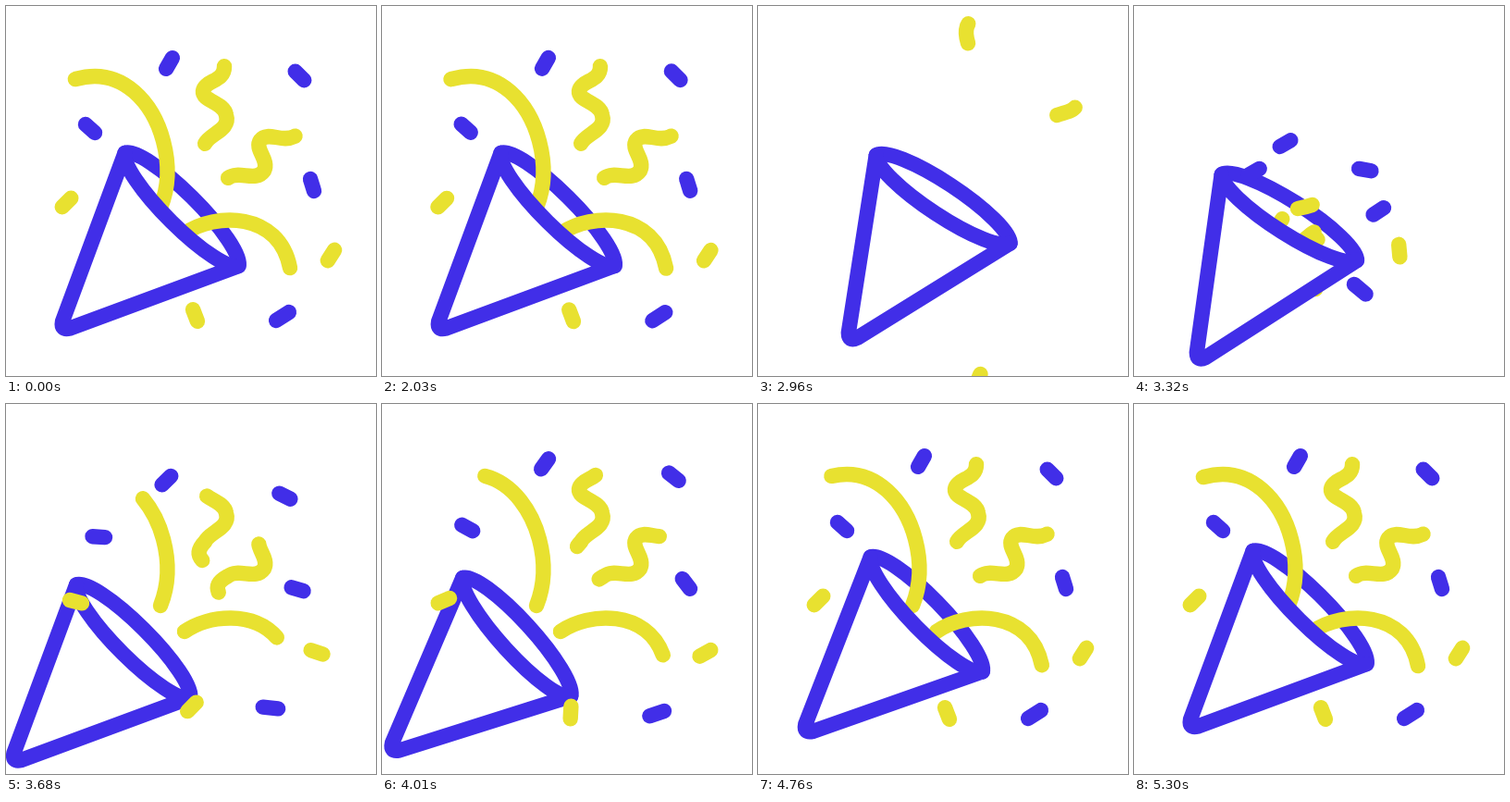
Animation of 400x400 px, one loop 5.33 s. Source, as an HTML page:

```html
<!DOCTYPE html>
<html lang="en">
<head>
<meta charset="utf-8">
<title>Party popper</title>
<style>
html, body { margin: 0; width: 100%; height: 100%; overflow: hidden; background: #fff; }
svg { display: block; width: 100vw; height: 100vh; }
path, line { stroke-width: 16.4; stroke-linecap: round; stroke-linejoin: round; fill: none; }
.blue { stroke: #412ee8; }
.yellow { stroke: #e8e130; }
#front { fill: #fff; }
</style>
</head>
<body>
<svg viewBox="0 0 400 400">
  <path id="back" class="blue" d="M128.5 159A87 19 45 0 1 251.5 281"/>
  <g id="under"></g>
  <g id="ribbons"></g>
  <path id="front" class="blue" d="M251.5 281A87 19 45 0 1 128.5 159L61 341Q59 351 69 348.500Z"/>
  <g id="over"></g>
</svg>
<script>
const LOOP = 5330, START = 2000, BLAST = 3170;
const $ = id => document.getElementById(id);

function make(tag, cls, parent) {
  const el = document.createElementNS("http://www.w3.org/2000/svg", tag);
  el.setAttribute("class", cls);
  parent.append(el);
  return el;
}

// Monotone cubic through rows of [time, ...values]
function sample(rows, t) {
  const n = rows.length - 1;
  if (t <= rows[0][0]) return rows[0].slice(1);
  if (t >= rows[n][0]) return rows[n].slice(1);
  let i = 0;
  while (t > rows[i + 1][0]) i++;
  const rate = (j, k) => (rows[j + 1][k] - rows[j][k]) / (rows[j + 1][0] - rows[j][0]);
  const slope = (j, k) => {
    if (j === 0 || j === n) return 0;
    const a = rate(j - 1, k), b = rate(j, k);
    return a * b > 0 ? 2 * a * b / (a + b) : 0;
  };
  const h = rows[i + 1][0] - rows[i][0], x = (t - rows[i][0]) / h;
  return rows[i].slice(1).map((v, m) => {
    const k = m + 1, w = rows[i + 1][k], y = x * x * (3 - 2 * x);
    return v + (w - v) * y
      + h * x * (1 - x) * ((1 - x) * slope(i, k) - x * slope(i + 1, k));
  });
}

// time, mouth centre x, y, tilt
const CONE = [
  [START, 190, 220, 0], [2570, 196, 213.5, -6.6], [3150, 201, 208, -12.5],
  [3320, 168, 228.5, -12.4], [3440, 147, 247, -9], [3560, 138, 255, -4],
  [3680, 137.5, 256.5, 0], [3900, 142, 254, 2.5], [4190, 154, 247.5, 3],
  [4340, 164.5, 241, 2.8], [4730, 181.5, 228, 1], [5300, 190, 220, 0]
];

// Ribbon route = lead-in + resting curve + way out.
// Keys are [time, tail, head] in lengths of the resting curve.
const squiggleOut = [[START, 0, 1], [2570, 0.24, 1.1], [3140, 1.5, 1.5]];
const squiggleIn = [[3200, -0.9, -0.9], [3320, -0.9, -0.76], [3680, -0.2, 0.6], [4340, 0, 1]];
const ribbons = [
  {
    lead: "M150 250Q159 232 167 218",
    rest: "C175 198 178 176 170 146C160 108 128 64 75 79",
    exit: "C50 86 20 88 11 55C5 35 -10 10 -34 10",
    out: [[START, 0, 1], [2570, 0.72, 1.38], [3080, 1.75, 1.75]],
    in: [[3240, -0.17, -0.17], [3320, -0.08, -0.07], [3680, 0, 0.6], [4340, 0, 0.93], [5240, 0, 1]]
  },
  {
    lead: "M199 253L193 246",
    rest: "C226 223 295 222 307 283",
    exit: "C311 303 306 357 276 365C255 372 240 390 235 415",
    out: [[START, 0, 1], [2570, 1.14, 1.66], [3080, 2.1, 2.1]],
    in: [[3240, -0.06, -0.06], [3320, -0.06, -0.05], [3680, 0, 0.76], [4340, 0, 0.98], [5240, 0, 1]]
  },
  {
    lead: "M177 219C205 214 225 200 222 182C223 172 197 168 215 149",
    rest: "C220 138 243 134 238 118C236 104 212 103 213 92C215 80 236 82 236 66",
    exit: "C236 60 231 58 231 55C230 44 222 34 226 22Q229 16 230 11",
    out: squiggleOut, in: squiggleIn
  },
  {
    lead: "M178 258L191 247C205 236 238 232 234 214C230 202 222 196 240 186",
    rest: "C252 177 270 191 279 178C285 166 268 155 275 145C283 135 298 148 312 141",
    exit: "C317 138 316 134 316 130C316 115 330 118 340 112Q348 106 349 96",
    out: squiggleOut, in: squiggleIn
  }
];

for (const r of ribbons) {
  r.el = make("path", "yellow", $("ribbons"));
  const measure = d => {
    r.el.setAttribute("d", d);
    return r.el.getTotalLength();
  };
  r.base = measure(r.lead);
  r.unit = measure(r.lead + r.rest) - r.base;
  r.total = measure(r.lead + r.rest + r.exit);
}

// rest x, y, angle | entry offset and turn | exit offset | length
const bits = [
  ["blue", 176.5, 62, -60, -13, 87, 30, -2, -63],
  ["blue", 317.5, 75.5, 45, -68, 102, -35, 60, -79],
  ["blue", 91, 132.5, 42, 39, 47, -72, -95, -103],
  ["blue", 331, 193.5, 73, -67, 28.5, -106, 73, -54],
  ["blue", 299, 335.5, -33, -55, -29.5, 73, 109, 67, 16.5],
  ["yellow", 65.5, 212.5, -45, 42, 5, 112, -100, 30],
  ["yellow", 204.5, 334.5, 69, -15, -30, 124, 34, 72],
  ["yellow", 351.5, 269.5, -57, -65, -5, 142, 100, 50]
].map(([color, x, y, angle, dx, dy, turn, ex, ey, len = 13.5]) => {
  const el = make("line", color, $("over"));
  el.setAttribute("x1", -len / 2);
  el.setAttribute("x2", len / 2);
  return { el, x, y, angle, dx, dy, turn, ex, ey };
});

function drawCone(t) {
  const [x, y, tilt] = sample(CONE, t);
  const move = `translate(${x - 190} ${y - 220}) rotate(${tilt} 190 220)`;
  $("back").setAttribute("transform", move);
  $("front").setAttribute("transform", move);
}

function drawRibbon(r, t) {
  const [a, b] = sample(t < BLAST ? r.out : r.in, t);
  const at = u => Math.min(r.total, Math.max(0, r.base + u * r.unit));
  const tail = at(a), len = at(b) - tail;
  r.el.style.display = len > 0.1 ? "" : "none";
  r.el.setAttribute("stroke-dasharray", `${len} 2000`);
  r.el.setAttribute("stroke-dashoffset", -tail);
}

function drawBit(b, t) {
  let x = b.x, y = b.y, angle = b.angle;
  if (t < BLAST) {
    const p = Math.max(0, (t - START) / 570) ** 2;
    x += b.ex * p;
    y += b.ey * p;
    angle += b.turn * 0.75 * p;
  } else {
    const far = 2.2 * Math.max(0, (4516 - t) / 1457) ** 4;
    x += b.dx * far;
    y += b.dy * far;
    angle += b.turn * Math.max(0, (4340 - t) / 1020) ** 1.45;
  }
  b.el.setAttribute("transform", `translate(${x} ${y}) rotate(${angle})`);
  const layer = t >= BLAST && t < 3500 ? $("under") : $("over");
  if (b.el.parentNode !== layer) layer.append(b.el);
}

function draw(t) {
  drawCone(t);
  ribbons.forEach(r => drawRibbon(r, t));
  bits.forEach(b => drawBit(b, t));
}

const t0 = performance.now();
function tick(now) {
  draw(Math.max(0, now - t0) % LOOP);
  requestAnimationFrame(tick);
}
draw(0);
requestAnimationFrame(tick);
</script>
</body>
</html>
```
